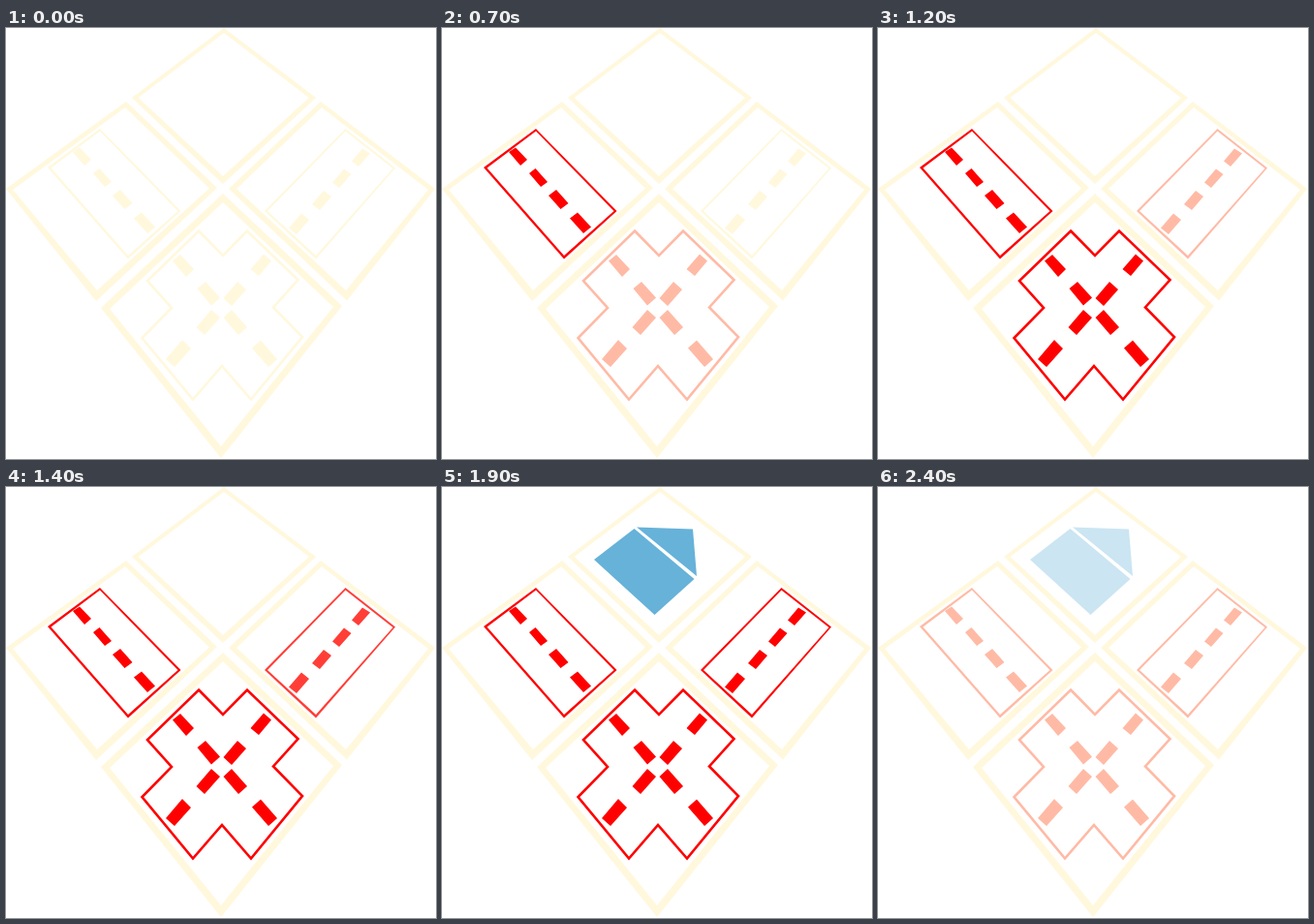
An HTML page that plays this animation: 444x445 px, repeating every 2.5 s.

```html
<!DOCTYPE html>
<html lang="en">
<head>
<meta charset="utf-8">
<title>Road tiles</title>
<style>
  html, body { margin: 0; height: 100%; overflow: hidden; background: #fff; }
  svg { display: block; width: 100vw; height: 100vh; }
  path { fill-rule: evenodd; fill: currentColor; }
  .tiles { color: #fff8dc; }
  .house { color: #39c; }
  .outline { fill: none; stroke: currentColor; stroke-width: 2.6; stroke-miterlimit: 10; }
</style>
</head>
<body>
<svg viewBox="0 0 444 445">
  <g class="tiles">
    <path d="M225 0 320 72 224 161 130 72Z M225 5 313 72 224 153 136.500 72Z"/>
    <path d="M124 76 218 165 93 282 0 166Z M123 82 210 165.500 94 271 7 167Z"/>
    <path d="M325 76 443 166 352 281.500 230 166Z M326 82 436 167 351 271 238 166Z"/>
    <path d="M224 171 347 287 222 444 98 289Z M224 180 338 288 222 432 107 290Z"/>
  </g>
  <g id="left">
    <path d="M43 144 97 104 180.500 189 126 238.500Z M46.500 144.500 97 106.500 177.500 189 126 235Z"/>
    <path d="M69 128 76 123.500 88 136 81 142Z M90 150 96.500 145 109 159 102 164Z
             M110 173 118 167 130.500 181 122.500 187Z M132 196.500 140 190.500 154 205.500 146 212Z"/>
  </g>
  <g id="cross">
    <path class="outline" d="M199 209.500 224 235 249 209.500 301.500 260 276 288.500 306 319 253 383.500 223 349 193 383.500 140.500 320 171 289 146 261Z"/>
    <path d="M172 240.500 180 234 194 249 186 257Z M197.500 269 206 262 221 278.500 212 286.500Z
             M224.500 299 233 291 249 309 240 317Z M254 330.500 263 322.500 280 342 271 350Z
             M266 233.500 274 240.500 261 256 252.500 249Z M239 262 248 270 233 287 224.500 279Z
             M212 291 221 299 205 317 196.500 309Z M182 322 191 331 174 350 165 342Z"/>
  </g>
  <g id="right">
    <path d="M267 189 350.500 104 402 144.500 320 238.500Z M270 189 350.500 106.500 399.500 145 320 235Z"/>
    <path d="M368 124.500 376 129.500 364 143 357 137.500Z M349 145.500 356.500 151 344 165 337 159.500Z
             M328 168 336 174 324 188 316 182Z M305 191.500 313 198 300 213 292 206.500Z"/>
  </g>
  <path id="house" class="house" d="M157 75 198.500 43 260.500 95 219.500 132Z M201 41.500 259 43.500 263 92Z"/>
</svg>
<script>
const LOOP = 2500, STEP = 100, STEPS = 4, FADE_OUT = 2200;
const starts = { left: 200, cross: 700, right: 1200, house: 1700 };

// Fraction of a stepped fade that begins at the given time
const fade = (t, start) =>
  Math.min(STEPS, Math.max(0, Math.floor((t - start) / STEP) + 1)) / STEPS;

function draw(now) {
  const t = now % LOOP;
  for (const [id, start] of Object.entries(starts)) {
    const level = Math.min(fade(t, start), 1 - fade(t, FADE_OUT));
    const { style } = document.getElementById(id);
    if (id === "house") style.opacity = level;
    else style.color = `rgb(255 ${248 * (1 - level)} ${220 * (1 - level)})`;
  }
  requestAnimationFrame(draw);
}
draw(0);
</script>
</body>
</html>
```
